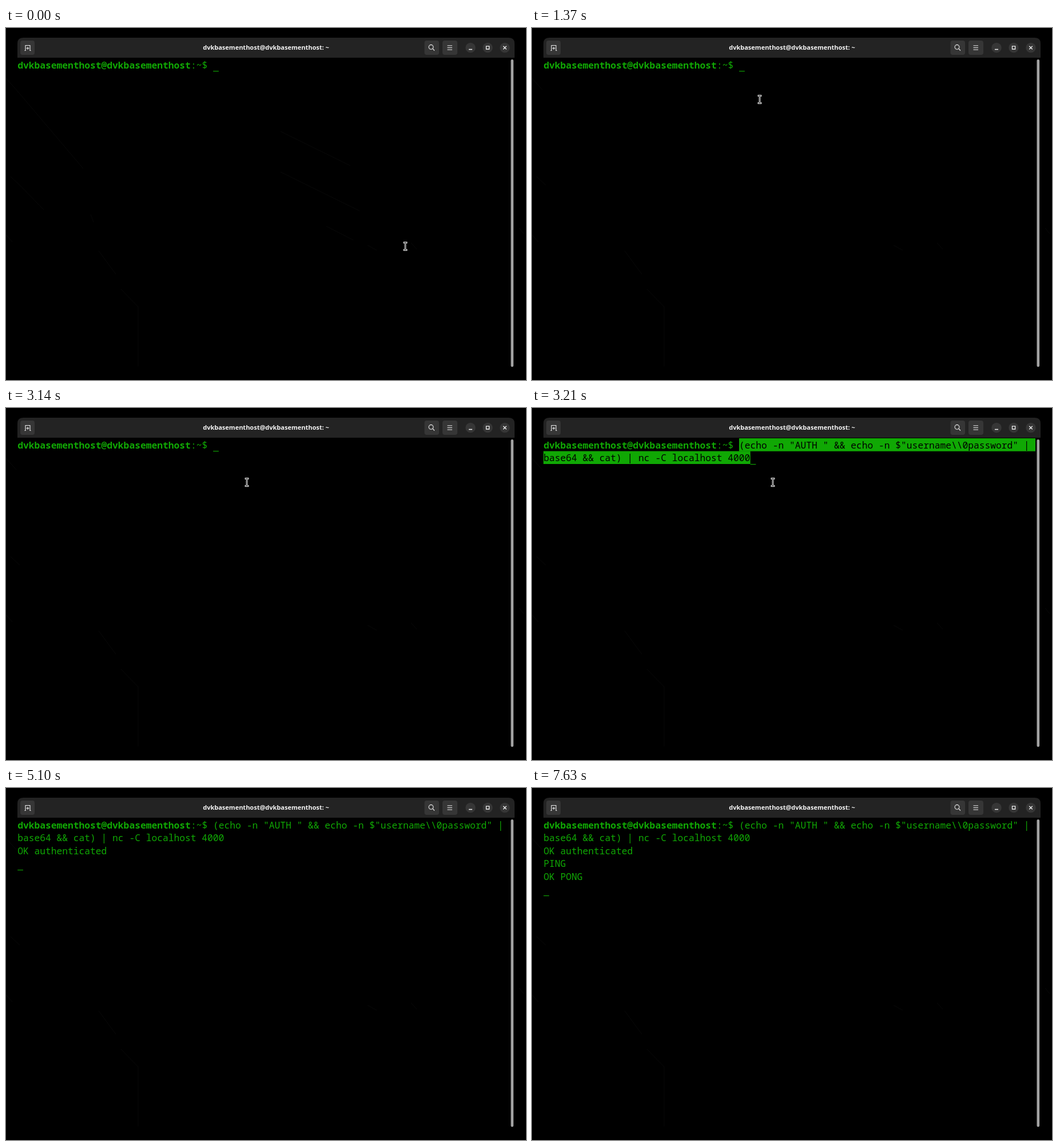
Animation of 909 by 616 pixels, one loop 8000 ms. Source, as an HTML page:

```html
<!DOCTYPE html>
<html lang="en">
<head>
<meta charset="utf-8">
<title>Terminal session</title>
<style>
  html, body { margin: 0; width: 100%; height: 100%; overflow: hidden; background: #000; }
  svg { display: block; }
  .mono { font: 16.28px "Noto Sans Mono", monospace; fill: #10a804; white-space: pre; font-variant-ligatures: none; }
  .bold { font-weight: 700; }
  .title { font: 600 11px "Noto Sans", "Open Sans", sans-serif; fill: #f4f4f4; text-anchor: middle; }
  .button { fill: #363636; }
  .icon { fill: none; stroke: #eee; stroke-width: 1.1; }
  .faint { fill: none; stroke: #090909; }
  .green { fill: #10a804; }
</style>
</head>
<body>
<svg width="909" height="616" viewBox="0 0 909 616">
  <rect width="909" height="616"/>
  <!-- wallpaper showing through -->
  <path class="faint" d="M0 88L18 108M8 260L24 275M0 362L11 374M162 390L192 431M201 457L231 488V592M632 380L648 389M708 376L718 387M897 350L905 360"/>
  <path class="faint" id="extra" d="M18 108L135 246M24 275L66 318M148 326L153 340M480 181L602 241M480 252L618 320M560 347L607 371"/>

  <path d="M20 52V27Q20 17 30 17H879Q889 17 889 27V52Z" fill="#232323"/>
  <rect class="button" x="25" y="22" width="25" height="25" rx="4"/>
  <rect class="button" x="731.5" y="22" width="25.5" height="25" rx="4"/>
  <rect class="button" x="763" y="22" width="26" height="25" rx="4"/>
  <circle class="button" cx="812" cy="34.5" r="8.7"/>
  <circle class="button" cx="842" cy="34.5" r="8.7"/>
  <circle class="button" cx="872" cy="34.5" r="8.7"/>
  <g class="icon">
    <path d="M32.5 39.5H34V30.5H42V39.5H43.5M38 33V38M35.5 35.5H40.5"/>
    <circle cx="743" cy="33.3" r="3.9"/>
    <path d="M745.8 36.2L749 39.5"/>
    <path d="M771.5 31H780M771.5 34.5H780M771.5 38H780"/>
    <path d="M809 37.5H815M839.5 31.8H844.7V37H839.5ZM869.2 31.7L874.8 37.3M874.8 31.7L869.2 37.3" stroke-width="1.3"/>
  </g>
  <text class="title" id="title" x="454.5" y="38"></text>
  <rect x="882.5" y="55" width="4.6" height="538" rx="2.2" fill="#a3a3a3"/>

  <g id="selection" class="green">
    <rect x="362" y="53" width="518" height="22.7"/>
    <rect x="20" y="75.5" width="361.7" height="22.5"/>
  </g>
  <g id="rows"></g>
  <rect id="cursor" class="green" width="9.77" height="1.1"/>
  <g id="pointer" fill="none">
    <path d="M-3.4 -6.5H3.4M-3.4 6.5H3.4M0 -6.5V6.5" stroke="#eee" stroke-width="2.8"/>
    <path d="M-2.6 -6.5H2.6M-2.6 6.5H2.6M0 -6.5V6.5" stroke="#111" stroke-width="0.9"/>
  </g>
</svg>
<script>
const LOOP = 8000, X0 = 20.2, CELL = 9.768, BASE = 70.8, LINE = 22.5;
const HOST = "dvkbasementhost@dvkbasementhost";
const $ = id => document.getElementById(id);

function addText(col, row, text, cls = "") {
  const el = document.createElementNS("http://www.w3.org/2000/svg", "text");
  el.setAttribute("class", "mono " + cls);
  el.setAttribute("x", X0 + col * CELL);
  el.setAttribute("y", BASE + row * LINE);
  el.textContent = text;
  $("rows").append(el);
  return el;
}

$("title").textContent = HOST + ": ~";
addText(0, 0, HOST, "bold");
addText(31, 0, ":~$");
const command = [
  addText(35, 0, '(echo -n "AUTH " && echo -n $"username\\\\0password" |'),
  addText(0, 1, "base64 && cat) | nc -C localhost 4000")
];
const auth = addText(0, 2, "OK authenticated");
const typed = addText(0, 3, "");
const reply = addText(0, 4, "OK PONG");

// time, column, row, lit
const cursorSteps = [
  [0, 35, 0, 1], [420, 35, 0, 0], [1050, 35, 0, 1], [1680, 35, 0, 0], [2240, 35, 0, 1],
  [3210, 37, 1, 1], [3690, 37, 1, 0], [4280, 37, 1, 1],
  [5100, 0, 3, 1], [5590, 0, 3, 0], [6250, 0, 3, 1],
  [6650, 1, 3, 1], [6890, 2, 3, 1], [7060, 3, 3, 1], [7220, 4, 3, 1],
  [7560, 0, 4, 1], [7630, 0, 5, 1]
];
const keyTimes = [6650, 6890, 7060, 7220];

const linear = p => p;
const smooth = p => (1 - Math.cos(Math.PI * p)) / 2;
// first step, last step, step count, target x, target y, easing
const moves = [
  [90, 260, 3, 704, 383, linear],
  [420, 1210, 11, 407, 151, smooth],
  [1290, 1370, 2, 398, 125, linear],
  [1450, 1680, 4, 387, 86, linear],
  [2240, 2240, 1, 387, 87, linear],
  [2500, 2650, 3, 421, 125, linear],
  [2810, 2960, 3, 426, 136, linear],
  [3140, 3140, 1, 421, 130, linear]
];

function pointerAt(t) {
  let x = 698, y = 382;
  for (const [start, end, count, tx, ty, ease] of moves) {
    if (t < start) break;
    const gap = count > 1 ? (end - start) / (count - 1) : 1;
    const step = Math.min(count, Math.floor((t - start) / gap + 1e-6) + 1);
    const p = ease(step / count);
    x += (tx - x) * p;
    y += (ty - y) * p;
  }
  return [x, y];
}

const show = (el, on) => { el.style.display = on ? "" : "none"; };

function draw(t) {
  const selected = t >= 3210 && t < 4440;
  show($("extra"), t < 260);
  show($("selection"), selected);
  for (const el of command) {
    show(el, t >= 3210);
    el.style.fill = selected ? "#000" : "";
  }
  show(auth, t >= 5100);
  typed.textContent = "PING".slice(0, keyTimes.filter(k => t >= k).length);
  show(reply, t >= 7630);

  const [, col, row, lit] = cursorSteps.filter(s => t >= s[0]).pop();
  show($("cursor"), lit);
  $("cursor").setAttribute("x", X0 + col * CELL);
  $("cursor").setAttribute("y", 75.5 + row * LINE - (row ? 0 : 0.5));

  const [x, y] = pointerAt(t);
  show($("pointer"), t < 4440);
  $("pointer").setAttribute("transform", `translate(${x} ${y})`);
}

const origin = performance.now();
function tick() {
  draw((performance.now() - origin) % LOOP);
  requestAnimationFrame(tick);
}
draw(0);
requestAnimationFrame(tick);
</script>
</body>
</html>
```
